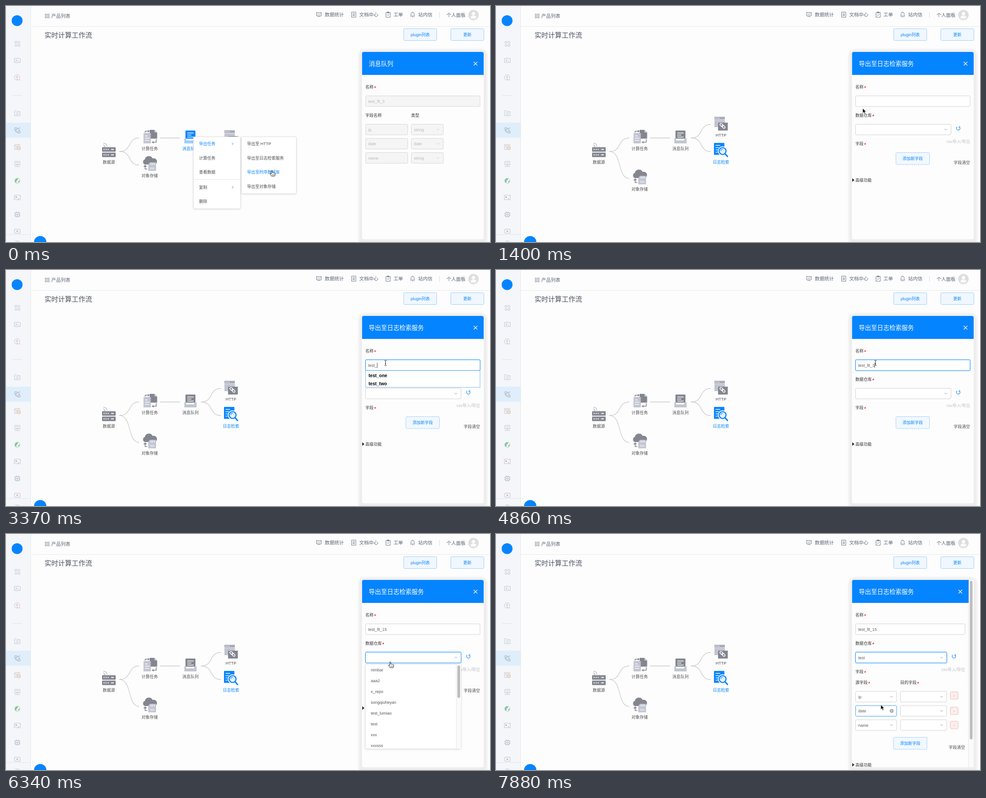
An HTML page for the animation above (8 s loop, 1068 px wide and 524 px high).

```html
<!DOCTYPE html>
<html lang="zh-CN">
<head>
<meta charset="utf-8">
<title>实时计算工作流</title>
<style>
html, body { margin: 0; width: 100%; height: 100%; overflow: hidden; background: #fdfdfd; }
svg { display: block; font-family: "Liberation Sans", "Noto Sans CJK SC", "Noto Sans CJK", sans-serif; }
text { white-space: pre; }
</style>
</head>
<body>
<svg width="1068" height="524" viewBox="0 0 1068 524">
  <defs>
    <filter id="soft" x="-10%" y="-10%" width="120%" height="120%"><feGaussianBlur stdDeviation="2"/></filter>
    <clipPath id="card"><rect x="785.5" y="102" width="268.5" height="416" rx="4"/></clipPath>
    <clipPath id="drop"><rect x="793" y="289.5" width="211" height="187.5"/></clipPath>
  </defs>
  <g id="page"></g>
  <g id="live"></g>
</svg>
<script>
const BLUE = '#0584ff', DARK = '#83868f', PALE = '#c2c5d1', INK = '#4a4a4a', LOOP = 8000;

// Drawing helpers; text and boxes are placed by their vertical centre.
const text = (x, y, s, c = INK, z = 9, a = 'start', w = 400) =>
  `<text x="${x}" y="${y + z * .37}" fill="${c}" font-size="${z}" text-anchor="${a}" font-weight="${w}">${s}</text>`;
const rect = (x, y, w, h, fill, stroke = 'none', r = 0, more = '') =>
  `<rect x="${x}" y="${y}" width="${w}" height="${h}" rx="${r}" fill="${fill}" stroke="${stroke}" ${more}/>`;
const line = (d, c, w = 1, fill = 'none', more = '') =>
  `<path d="${d}" stroke="${c}" stroke-width="${w}" fill="${fill}" ${more}/>`;
const fillPath = (d, c) => `<path d="${d}" fill="${c}"/>`;
const dot = (x, y, r, fill, stroke = 'none', w = 1) =>
  `<circle cx="${x}" cy="${y}" r="${r}" fill="${fill}" stroke="${stroke}" stroke-width="${w}"/>`;
const at = (x, y, s) => `<g transform="translate(${x} ${y})">${s}</g>`;
const arrow = (x, y, c = '#aaa', up = 1) => line(`M${x - 2.7} ${y - 1.4 * up}l2.7 2.8l2.7 -2.8`.replace(/2\.8/g, 2.8 * up).replace('--', ''), c, .9);
const next = (x, y, c) => line(`M${x - 1.3} ${y - 2.7}l2.7 2.7l-2.7 2.7`, c, .9);
const label = (x, y, s) => text(x, y, s, '#333') + text(x + s.length * 9 + 1.4, y + 2.1, '*', '#f0342c', 10, 'start', 700);
const shade = (x, y, w, h) => rect(x, y + 1, w, h, '#000', 'none', 3, 'opacity=".16" filter="url(#soft)"') + rect(x, y, w, h, '#fff', '#e2e2e2', 2);

function field(x, y, w, s = '', o = {}) {
  const glow = o.focus ? rect(x, y - 11.75, w, 23.5, 'none', '#b5dcff', 2.5, `stroke-width="3.4" opacity="${o.focus}"`) : '';
  const edge = o.focus || o.hover ? '#3a9eff' : o.off ? '#d6d6d6' : '#d2d2d2';
  return glow + rect(x, y - 11.75, w, 23.5, o.off ? '#f5f5f5' : '#fff', edge, 2) +
    text(x + 5.7, y, s, o.off ? '#b8b8b8' : '#5c5c5c');
}

const select = (x, y, w, s, o = {}) => field(x, y, w, s, o) +
  (o.hover
    ? dot(x + w - 11, y, 4.3, '#a9a9a9') + line(`M${x + w - 12.5} ${y - 1.5}l3 3m0 -3l-3 3`, '#fff', .9)
    : arrow(x + w - 11.3, y, o.off ? '#c4c4c4' : '#8c8c8c', o.open ? -1 : 1));

function sidebar() {
  const c = '#bfc4d0', red = '#e9a08c';
  const icons = [
    [84, line('M-5 -5.5h4v4h-4zM1.5 1.5h4v4h-4z', c) + dot(3.6, -3.5, 2.2, 'none', c) + dot(-3, 3.6, 2.2, 'none', c)],
    [121, line('M-6.5 -4.5h13v9h-13zM-3.5 2l1.5 -4l1.5 4M1 1.5h3M0 -6.5v2', c)],
    [159, dot(-.5, -.5, 6, 'none', c) + line('M4 5.5h3', c) + dot(-.5, -1.5, 1.5, 'none', red) + line('M-2 3h3', red)],
    [238, line('M-6 5.5v-11h4l1.5 2h6.500v9zM-3 -.5h6M-3 2.500h6', c)],
    [276, line('M-5.500 -5.5h5v4h-5zM1 2h5v4h-5zM0 -3.500h4v5M-3 -1v5h3.500M-6 1h3M3 -5.500h3', '#9faabc')],
    [313, line('M-6 -5.500h11v4M-6 -5.500v11h6M-6 -2.500h11M-3.500 0h4M-3.500 2.500h3', c) + dot(3.500, 3, 3.300, '#fdf3ea', '#e3a271') + line('M3.500 1.500v1.700h1.500', '#e3a271', .8)],
    [351, line('M-5.500 -6h11v8h-11zM-5.500 5.500h11M-3 -3h6', c) + line('M-2.500 0l2.500 1.500l2.500 -1.500', red)],
    [388, dot(0, 0, 6, '#edf6ef', '#b9c8c4') + fillPath('M-4.500 -3q4 -3 6 -2l-1 4l-3 1l1 3l-2 1.500q-3 -3 -1 -7.500zM2 1l3 -1q0 3 -3 4z', '#7fc596')],
    [425, line('M-6.500 -5h13v10h-13z', c) + rect(-4, -2, 3, 3, red) + line('M1 3h3', red)],
    [463, line('M-4.500 -4.500h9v9h-9zM-1.800 -1.800h3.600v3.600h-3.600zM-2 -6.500v2M2 -6.500v2M-2 4.500v2M2 4.500v2M-6.500 -2h2M-6.500 2h2M4.500 -2h2M4.500 2h2', '#aab1c0')],
    [500, line('M-6 -4.500h12v9h-12z', c) + fillPath('M-1.500 -2.200l4 2.200l-4 2.200z', red)]
  ];
  return rect(0, 0, 54, 524, '#f4f6fa') + rect(0, 259, 54, 33.5, '#dfeefa') + line('M54.5 0V524', '#e5e8ee') +
    line('M14 198.500H36', '#dfe2e8') + icons.map(([y, s]) => at(25, y, s)).join('') +
    rect(0, 507, 54, 17, '#f4f6fa') + line('M0 507.500H54', '#e0e4ea') +
    line('M21 520l3.500 3.500l-3.500 3.500M25.500 520l3.500 3.500l-3.500 3.500', '#a5abb8', .9) +
    dot(24.5, 32.5, 12, BLUE);
}

function topbar() {
  const c = '#626b7d', t = '#5a6375';
  const button = (x, s) => rect(x, 50.5, 73, 26, '#f0f7ff', '#9fceff', 2) + text(x + 36.5, 64, s, BLUE, 9, 'middle');
  return line('M55 45.500H1068', '#e7e8ea') +
    line('M86.500 17.800h3.300v3.300h-3.300zM92 17.800h3.300v3.300h-3.300zM86.500 23.200h3.300v3.300h-3.300zM92 23.200h3.300v3.300h-3.300z', '#7e8696', .9) +
    text(100, 22, '产品列表', t, 10.5) +
    line('M684.500 14.500h12M685.500 14.500v7.500h10v-7.500M688 24.500l2.500 -2.500l2.500 2.500M687.500 19.500l2 -2l1.800 1.500l2.200 -2.500', c, .9) +
    text(703.5, 19, '数据统计', t, 10.5) +
    line('M762.500 13.500h9.500v11.500h-9.500zM764.800 17h5M764.800 19.300h5M764.800 21.600h5', c, .9) +
    text(779.5, 19, '文档中心', t, 10.5) +
    line('M838.500 14.500h9.500v10.500h-9.500zM841.500 13h3.500v2.500h-3.500zM841 19.500l1.800 1.800l3 -3.300', c, .9) +
    text(855, 19, '工单', t, 10.5) +
    line('M892.500 22.500h9.500l-1.300 -1.800v-3.200a3.500 3.500 0 0 0 -7 0v3.200zM896 24.800h2.500M897.300 12.500v1.500', c, .9) +
    text(909.5, 19, '站内信', t, 10.5) + line('M956.500 14V26', '#d5d8de') +
    text(972, 20, '个人面板', t, 10.5) +
    dot(1031.5, 20, 11.5, '#dedede') + dot(1031.5, 17, 3.8, '#fff') + fillPath('M1024.500 26.500q1 -5 7 -5t7 5q-7 3 -14 0z', '#fff') +
    text(85, 64, '实时计算工作流', '#4c5260', 15) + button(877.5, 'plugin列表') + button(981.5, '更新') +
    dot(75.5, 524.5, 13.7, BLUE);
}

// Workflow nodes
const name = (x, y, s, c = '#4c4c4c') => text(x, y, s, c, 9, 'middle');

const source = [313.5, 325.5].map(y => rect(212, y, 30, 10, DARK, 'none', 1) +
    [216.5, 221, 225.5].map(x => dot(x, y + 5, 1.2, '#fff')).join('') + rect(232, y + 4, 6, 2, '#fff')).join('') +
  line('M217.500 310v3.500M214 308.500q4.500 0 4.500 4.500M214.500 304.500q8 0 8 7.500', PALE, 1.6) + name(227, 347, '数据源');

const compute = fillPath('M317 275h10.500l6 6v13.500h-16.500z', DARK) + fillPath('M327.500 275v6h6z', PALE) +
  rect(303.5, 282, 16, 23, PALE) + line('M306.500 288.500h6M306.500 293.500h10M306.500 298.500h10', '#fff', 1.6) +
  line('M307 281v-3h7M331.500 296v6.500h-7', DARK, 1.6) + fillPath('M313 275l4 3l-4 3zM325.500 299.500l-4 3l4 3z', DARK) +
  name(317, 317, '计算任务');

const queue = (on) => rect(396, 276.5, 22, 18, on ? BLUE : DARK, 'none', 1) +
  line('M400 282h14M400 286.500h9M400 291h14', '#fff', 1.5) +
  fillPath('M393.500 294h4v4.500h18v-4.500h5v11h-27z', on ? '#9bceff' : PALE) + name(407, 317, '消息队列', on ? BLUE : '#4c4c4c');

const storage = fillPath('M307 382a6 6 0 0 1 -.5 -11.500a9 9 0 0 1 17 -2a7 7 0 0 1 5 13.500z', DARK) +
  fillPath('M314 381l4 -4h13v19h-17z', PALE) + line('M320 379v4M323.500 379v4M327 379v4', '#fff', 1.4) +
  rect(317.5, 388, 10, 5, '#d8dae2') + line('M307 385v7h5', DARK, 1.7) + fillPath('M303 387l4 -4.500l4 4.500z', DARK) +
  name(317, 407, '对象存储');

const http = rect(482, 246, 23, 23, PALE, 'none', 1) + rect(482, 246, 23, 6, '#a9acb8', 'none', 1) +
  [485, 488.5, 492].map(x => dot(x, 249, 1, '#fff')).join('') + line('M482 252.500h23', '#fff', .8) +
  rect(490, 259, 21.5, 17.5, DARK) +
  at(499.5, 266, '<g transform="rotate(42)">' + rect(-6.5, -2.3, 7.5, 4.6, 'none', '#fff', 2.3, 'stroke-width="1.5"') +
    rect(-.5, -2.3, 7.5, 4.6, 'none', '#fff', 2.3, 'stroke-width="1.5"') + '</g>') + name(496.5, 287, 'HTTP');

const search = rect(481, 304, 23, 26.5, BLUE, 'none', 1) + line('M484.500 309.500h10M484.500 314.500h7M484.500 319.500h5M484.500 324.500h5', '#fff', 1.5) +
  dot(500, 322, 10.5, '#fdfdfd') + dot(500, 322, 7.6, '#e2f1ff', BLUE, 2.4) + line('M505.500 328l6 7', BLUE, 3) +
  line('M496 322a4 4 0 0 1 4 -4', BLUE, 1.3) + name(496.5, 347, '日志检索', BLUE);

const link = (x1, y1, x2, y2) => line(`M${x1} ${y1}C${x1 + 29} ${y1} ${x2 - 27} ${y2} ${x2} ${y2}`, '#cbcbcb', 1.3);

function flow(split) {
  const low = split ? 0 : -30, top = split ? 0 : 30;
  return link(250, 323, 294, 293) + link(250, 323, 294, 383 + low) + link(340, 293, 384, 293) +
    link(430, 293, 474, 263 + top) + (split ? link(430, 293, 474, 323) + search : '') +
    source + compute + queue(!split) + at(0, low, storage) + at(0, top, http);
}

function menus(hover) {
  const sub = ['导出至 HTTP', '导出至日志检索服务', '导出至时序数据库', '导出至对象存储'];
  return shade(413.5, 290.5, 104, 159.5) + text(426, 306, '导出任务', BLUE) + next(500, 306, BLUE) +
    text(426, 337.5, '计算任务') + text(426, 369, '查看数据') + line('M414 385.500H517', '#e4e4e4') +
    text(426, 402.5, '复制') + next(500, 402.5, '#666') + text(426, 434, '删除') +
    shade(519.5, 290.5, 121, 126) +
    sub.map((s, i) => text(532, 306 + i * 31.5, s, i === hover ? BLUE : INK)).join('');
}

// Side panel
function queueForm() {
  const rows = [['ip', 'string'], ['date', 'date'], ['name', 'string']];
  return label(793, 180, '名称') + field(793.5, 211.3, 252.5, 'test_llt_3', { off: 1 }) +
    text(793, 243, '字段名称', '#333') + text(894, 243, '类型', '#333') +
    rows.map(([a, b], i) => field(793.5, 274.3 + i * 31.5, 93, a, { off: 1 }) +
      select(894.5, 274.3 + i * 31.5, 70.5, b, { off: 1 })).join('');
}

function exportForm(s) {
  const side = s.rows ? 11 : 0, q = s.rows ? 9.5 : 0, drop = s.rows ? 126 : 0;
  const caretX = 799.6 + s.caretAt;
  const rows = !s.rows ? '' : label(793, 330, '源字段') + label(892, 330, '目的字段') +
    ['ip', 'date', 'name'].map((n, i) => {
      const y = 361.3 + i * 31.5, m = y - (i ? 0 : 2.5);
      return select(793.5, y, 90.5, n, { hover: Math.abs(s.y - y) < 14 }) + select(892.5, y, 102, '') +
        rect(1002.5, m - 8.5, 17, 16.5, '#fdeeee', '#f0b9b9', 2) + text(1011, m, '-', '#e5534b', 9, 'middle');
    }).join('');
  const lower = label(793, 243, '数据仓库') +
    select(793.5, 274.3, 210.5 - q, s.repo, { focus: s.pick, open: s.list === 1 }) +
    at(1020 - q, 271.5, line('M2.800 -2.800A4 4 0 1 1 -2.500 -3M3.200 -5v2.800h-2.800', BLUE, 1.1)) +
    label(793, 306, '字段') + text(1046 - side, 300.5, 'csv导入/导出', '#bcbfc6', 9, 'end') + rows +
    rect(882.5 - side / 2, 325.5 + drop, 74, 26.5, '#f1f8ff', '#74b8fb', 2, 'stroke-dasharray="2.4 1.6"') +
    text(919.5 - side / 2, 339 + drop, '添加新字段', BLUE, 9, 'middle') +
    text(1046 - side, 348 + drop, '字段清空', INK, 9, 'end') +
    fillPath(`M786 ${382.5 + drop}l5 4l-5 4z`, '#333') + text(793, 387 + drop, '高级功能', '#333');
  return label(793, 180, '名称') + at(0, s.value === 't' ? 13.5 : 0, lower) +
    field(793.5, 211.3, 252.5 - side, s.value, { focus: s.type }) +
    (s.caret ? line(`M${caretX} 206V217`, '#333', .9) : '') +
    (s.hints.length ? rect(793.5, 223.5, 252.5, s.hints.length * 18 + 1, '#fff', '#7db9ee') +
      s.hints.map((h, i) => text(800, 234 + i * 18, h, '#000', 10, 'start', 700)).join('') : '');
}

function repoList(s) {
  const names = ['nimbar', 'aaa2', 'x_repo', 'songqiuheyan', 'test_lumiao', 'test', 'xxx', 'xxxsss'];
  const hover = Math.floor((s.y - 289.5) / 24);
  return `<g opacity="${s.list}">` + shade(793, 289.5, 211, 187.5) + '<g clip-path="url(#drop)">' +
    names.map((n, i) => (i === hover ? rect(793, 289.5 + i * 24, 200, 24, '#e8f4fd') : '') +
      text(805, 301.5 + i * 24, n, '#555')).join('') +
    rect(993.5, 289, 11, 189, '#fafafa', '#e6e6e6') + rect(996, 292, 6, 72, '#bdbdbd', 'none', 3) + '</g></g>';
}

function panel(s) {
  const w = s.rows ? 257.5 : 268.5, x = s.rows ? 1024.5 : 1036;
  return rect(778, 96, 284, 440, '#000', 'none', 14, 'opacity=".06" filter="url(#soft)"') +
    '<g clip-path="url(#card)">' + rect(785, 102, 270, 417, '#fdfdfd') + rect(785.5, 102, w, 51, BLUE) +
    text(800.5, 128, s.menu ? '消息队列' : '导出至日志检索服务', '#fff', 13.5) +
    line(`M${x - 4} 124l8 8m0 -8l-8 8`, '#fff', 1.2) + (s.menu ? queueForm() : exportForm(s)) +
    (s.rows ? rect(1043, 102, 11, 416, '#fafafa') + line('M1042.500 153V518', '#e6e6e6') + rect(1045.5, 104, 6, 352, '#bdbdbd', 'none', 3) : '') +
    '</g>' + (s.list ? repoList(s) : '');
}

const cursors = {
  hand: line('M-1.200 1a1.100 1.100 0 0 1 2.200 0V5q2 -.9 2.400 .4q1.800 -.6 2.200 .6q1.800 -.3 1.800 1.200v2.400q0 1.300 -1 3.200H-.6q-1 -2.300 -3.200 -4.400q-.7 -1.600 1.100 -1.400l1.500 1.300z', '#222', 1, '#fff') +
    line('M1.300 8.500v2.500M3.300 8.500v2.500M5.200 8.500v2.500', '#222', .7),
  arrow: line('M0 0V11l2.500 -2.300l1.900 4.300l2 -.9l-1.900 -4.100h3.500z', '#fff', .8, '#111'),
  beam: line('M-2.500 -5.500q2.500 0 2.500 1.500v8q0 1.500 -2.500 1.500M2.500 -5.500q-2.500 0 -2.500 1.500M2.500 5.500q-2.500 0 -2.500 -1.500M-1.200 1.500h2.400', '#222', 1)
};

// Time tracks: each entry holds until the next one.
const pointer = [
  [0, 'hand', 586.5, 365], [140, 'hand', 586, 354], [350, 'hand', 585, 341], [800, 'arrow', 585, 341],
  [960, 'arrow', 622, 322], [1110, 'arrow', 700, 282], [1250, 'arrow', 770, 249], [1400, 'arrow', 809, 227],
  [1550, 'beam', 829, 212], [1750, 'beam', 837.5, 206.5], [5160, 'beam', 840, 214], [5300, 'arrow', 843, 246],
  [5450, 'arrow', 846, 292], [5600, 'arrow', 848, 308], [5740, 'hand', 849, 284], [5890, 'hand', 850, 271],
  [6340, 'hand', 848, 284], [6500, 'hand', 844, 318], [6650, 'hand', 838, 358], [6810, 'hand', 832, 396],
  [6960, 'hand', 828, 420], [7110, 'hand', 827, 426], [7560, 'hand', 830, 420], [7730, 'hand', 842, 398], [7880, 'arrow', 849, 379]
];
const typed = [[0, ''], [2630, 't'], [2780, 'te'], [2920, 'test'], [3370, 'test_'], [3520, 'test_l'], [3660, 'test_ll'],
  [3810, 'test_llt'], [4260, 'test_llt_'], [4860, 'test_llt_1'], [5010, 'test_llt_15']];
const caret = [[0, 0], [1900, 1], [2330, 0], [2630, 1], [5300, 0]];
const typeGlow = [[0, 0], [1900, .5], [2040, 1], [6040, 0]];
const pickGlow = [[0, 0], [6040, .5], [6190, 1]];
const listFade = [[0, 0], [6040, .5], [6190, 1], [7260, .4], [7410, 0]];
const hold = (track, t) => track.filter(k => k[0] <= t).pop();

const widths = { t: .278, e: .556, s: .5, _: .556, l: .222, 1: .556, 5: .556 };
const measure = s => [...s].reduce((n, c) => n + widths[c] * 9, 0);

function stateAt(t) {
  const [, kind, x, y] = hold(pointer, t), value = hold(typed, t)[1];
  const all = ['T_ClientGameStartInfo', 'test_one', 'test_two'];
  return {
    kind, x, y, value, menu: t < 800, rows: t >= 7410,
    caret: hold(caret, t)[1], caretAt: measure(value), type: hold(typeGlow, t)[1],
    pick: hold(pickGlow, t)[1], list: hold(listFade, t)[1], repo: t >= 7260 ? 'test' : '',
    hints: value ? all.filter(h => h.toLowerCase().startsWith(value)) : []
  };
}

const live = document.getElementById('live');
let last = '';
function draw() {
  const s = stateAt(performance.now() % LOOP), key = JSON.stringify(s);
  if (key !== last) {
    last = key;
    live.innerHTML = flow(!s.menu) + panel(s) +
      (s.menu ? menus(Math.floor((s.y - 290) / 31.5)) : '') + at(s.x, s.y, cursors[s.kind]);
  }
  requestAnimationFrame(draw);
}
document.getElementById('page').innerHTML = rect(0, 0, 1068, 524, '#fdfdfd') + sidebar() + topbar();
draw();
</script>
</body>
</html>
```
